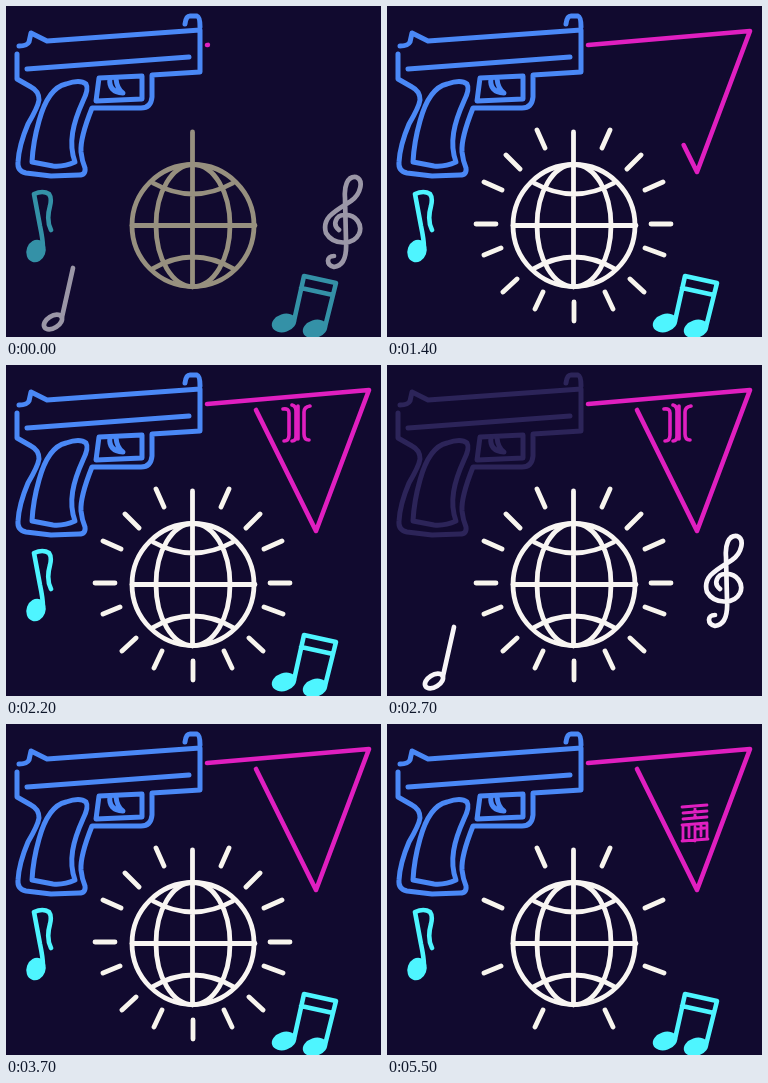
Write an HTML page that moves like this. It is 375x331 px and loops after 5.6 s.

```html
<!DOCTYPE html>
<html lang="en">
<head>
<meta charset="utf-8">
<title>Neon disco</title>
<style>
html, body { margin: 0; width: 100%; height: 100%; overflow: hidden; background: #110a2f; }
svg { display: block; width: 100vw; height: 100vh; fill: none; stroke-linecap: round; stroke-linejoin: round; }
svg * { animation: 5.6s step-end infinite; }
.scene { filter: blur(.45px); }

.gun { stroke: #4a88f6; stroke-width: 5; animation-name: gun; }
.flag { stroke: #e01fc0; stroke-width: 4.6; }
.line { stroke-dasharray: 1 2; animation-name: draw; animation-timing-function: linear; }
.ball { stroke: #f8f5f2; stroke-width: 4.8; animation-name: ball; animation-timing-function: linear; }
.rays { stroke: #f8f5ee; stroke-width: 4.8; animation-name: rays; }
.extra { animation-name: extra; }
.teal { stroke: #4ef5ff; stroke-width: 4.6; animation-name: teal; }
.teal .head { fill: #4ef5ff; stroke: none; }
.white { stroke: #f8f5f8; stroke-width: 4.7; animation-name: white; }
.first { stroke-width: 3.6; animation-name: first; }
.second { stroke-width: 2.8; animation-name: second; }

@keyframes gun { 0%, 50% { stroke: #4a88f6; } 46.43% { stroke: #2c2459; } }
@keyframes draw {
  0%, 1.79% { stroke-dashoffset: .998; }
  32.14%, 100% { stroke-dashoffset: 0; }
}
@keyframes ball { 0% { stroke: #97907f; } 11%, 100% { stroke: #f8f5f2; } }
@keyframes rays { 0% { opacity: 0; } 25%, 100% { opacity: 1; } }
@keyframes extra { 0% { opacity: 1; } 73.21%, 100% { opacity: 0; } }
@keyframes teal {
  0% { opacity: .58; }
  25%, 57.14%, 89.29% { opacity: 1; }
  41.07%, 73.21% { opacity: 0; }
  100% { opacity: 1; }
}
@keyframes white {
  0% { opacity: .6; }
  25%, 57.14%, 89.29% { opacity: 0; }
  41.07%, 73.21% { opacity: 1; }
  100% { opacity: 0; }
}
@keyframes first {
  0%, 53.57%, 87.5%, 100% { opacity: 0; }
  39.29%, 73.21% { opacity: 1; }
}
@keyframes second {
  0%, 64.29% { opacity: 0; }
  53.57%, 87.5%, 100% { opacity: 1; }
}
</style>
</head>
<body>
<svg viewBox="0 0 375 331" preserveAspectRatio="none">
  <g class="scene">
    <g class="gun">
      <path d="M13 40Q21 40 23 36L25 27L41 35L194 24V66L146 69V91Q145 102 135 102H86
        Q74 132 75 146Q76 155 79 162Q80 169 73 169L45 170L20 167Q11 165 12 156Q13 139 22 118
        Q32 101 33 94Q33 85 25 81L11 73V48"/>
      <path d="M179 18Q180 10 184 10H191Q194 11 194 21M21 63L183 51"/>
      <path d="M93 72L136 70V93L90 95Z"/>
      <path d="M104 72Q102 86 117 87Q111 83 110 73"/>
      <path d="M60 78Q74 73 80 78Q83 83 77 95C67 117 62 137 69 156Q58 161 47 160L26 156
        Q27 136 33 115Q42 82 60 78Z"/>
    </g>

    <g class="flag">
      <path class="line" pathLength="1" d="M201 39L363 25L310 166L250 45"/>
      <path class="first" d="M277 44Q283 43 283 48V70Q283 76 278 76M286 40Q290 41 290 46V71Q290 76 286 76
        M292 41V74M304 41Q298 42 298 47V69Q298 75 303 75"/>
      <path class="second" d="M295 83L320 81M296 89L320 87M296 95L320 93M308 82V94M295 101L320 99
        M295 117L321 115M296 101V117M302 101V113M308 103V117M314 100V112M320 99V115M309 105L318 104"/>
    </g>

    <g class="ball">
      <circle cx="187" cy="219.5" r="61"/>
      <ellipse cx="187" cy="219.5" rx="37" ry="61"/>
      <path d="M186.500 126V281M126 219.500H249M147 177Q187 199 227 177M146 263Q187 239 228 263"/>
    </g>

    <g class="rays">
      <path d="M150 124L158 142M223 124L215 142M97 176L115 184M276 176L258 184
        M97 249L114 242M277 249L258 242M148 303L156 286M226 303L218 286"/>
      <path class="extra" d="M119 149L133 163M254 149L240 163M89 218H109M264 218H284
        M116 286L130 273M257 286L243 273M187 296V315"/>
    </g>

    <g class="teal">
      <ellipse class="head" cx="30" cy="245" rx="9.500" ry="11.500" transform="rotate(20 30 245)"/>
      <path d="M37 242Q37 234 34 220L28 188Q37 184 43 188Q46 192 44 200Q40 214 45 224"/>
      <ellipse class="head" cx="278" cy="317" rx="12.500" ry="9" transform="rotate(-18 278 317)"/>
      <ellipse class="head" cx="309" cy="323" rx="12.500" ry="9" transform="rotate(-18 309 323)"/>
      <path d="M288 315L298 270L330 277L319 321M295 282L327 289"/>
    </g>

    <g class="white">
      <ellipse cx="47" cy="316" rx="10" ry="6" transform="rotate(-32 47 316)"/>
      <path d="M56 311L67 262"/>
      <path d="M333 224C326 219 330 209 338 209C350 208 357 219 353 228C347 240 327 239 320 227
        C315 211 331 204 345 195C355 188 358 174 350 171C341 170 338 181 339 192L340 235
        C341 251 337 260 328 261C320 259 320 250 328 250"/>
    </g>
  </g>
</svg>
</body>
</html>
```
